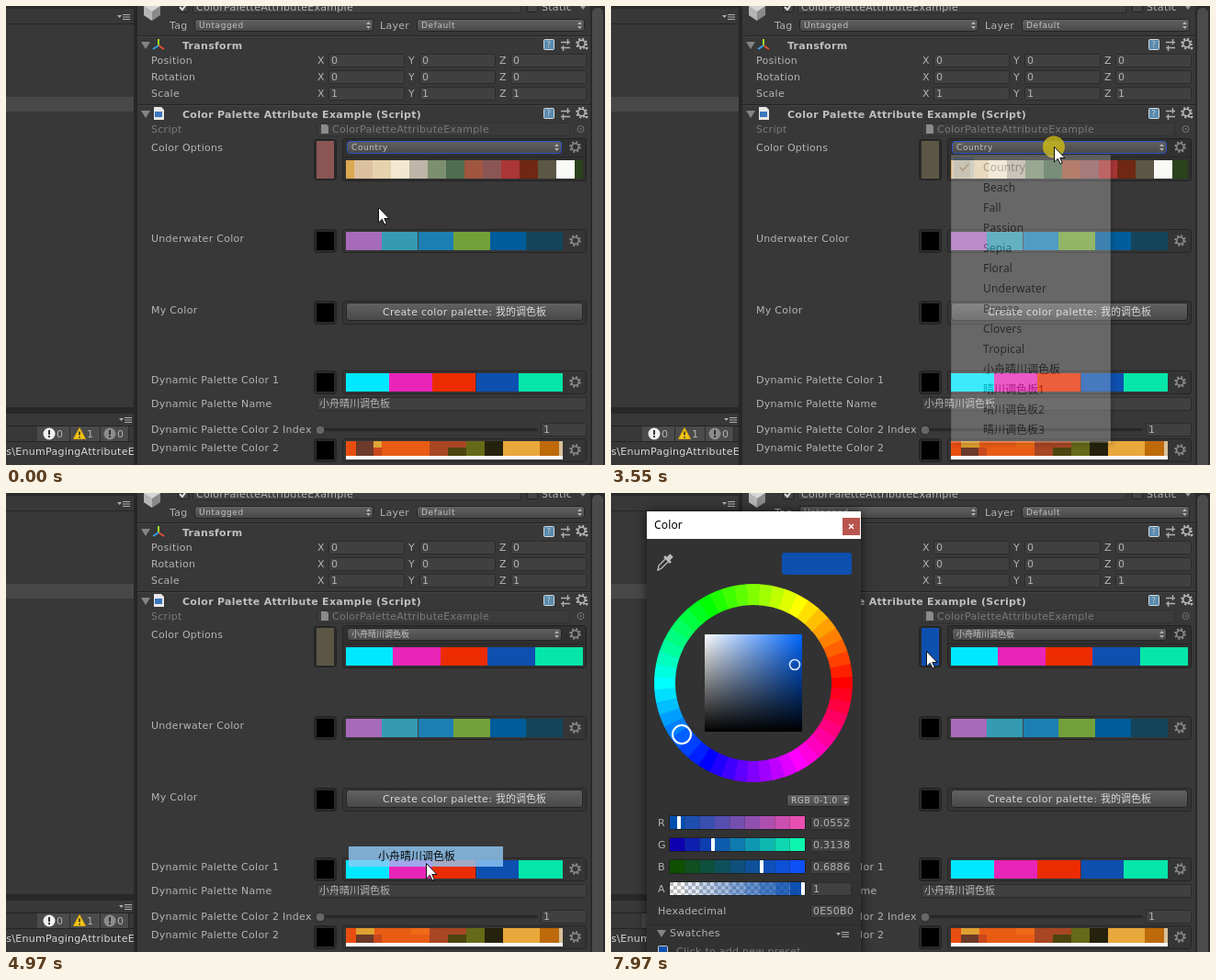
Recreate the animation shown at these times as an HTML page. Size 652x500 px, loop 8000 ms.

```html
<!DOCTYPE html>
<html lang="zh-CN">
<head>
<meta charset="utf-8">
<title>Palette inspector</title>
<style>
html, body { margin: 0; width: 100%; height: 100%; overflow: hidden; background: #383838; }
svg { display: block; width: 652px; height: 500px; }
text { font: 11px "DejaVu Sans", "Noto Sans CJK SC", "Noto Sans CJK", sans-serif; letter-spacing: .28px; fill: #b4b4b4; white-space: pre; }
.bold { font-weight: bold; letter-spacing: .3px; fill: #c0c0c0; }
.dim { fill: #7a7a7a; }
.light { fill: #d8d8d8; }
.mini { font-size: 9px; letter-spacing: .6px; fill: #c4c4c4; }
.cn { letter-spacing: 0; }
.menu { font: 12px "Noto Sans", "Noto Sans CJK SC", "Noto Sans CJK", sans-serif; letter-spacing: .15px; fill: #000; }
.menu.cn { letter-spacing: 0; }
.mid { text-anchor: middle; }
#frame { filter: drop-shadow(0 0 6px rgba(0,0,0,.65)); }
#list { filter: drop-shadow(3px 3px 2px rgba(0,0,0,.5)); }
</style>
</head>
<body>
<script>
const NAME = '小舟晴川调色板';
const COUNTRY = ['#d9a850', '#dbc19f', '#e6d3ae', '#f2e7d0', '#bfb5a8', '#7c9070', '#4f6d50',
  '#a0563f', '#8b5555', '#aa3637', '#702812', '#5c5645', '#f9faf6', '#2a431c'];
const NEON = ['#00e8ff', '#e825b8', '#ec2c00', '#0e50b0', '#06e6a8'];
const WATER = ['#a86abb', '#359bb3', '#1b7fb4', '#72a139', '#005c9a', '#14455b'];
const MENU = ['Country', 'Beach', 'Fall', 'Passion', 'Sepia', 'Floral', 'Underwater', 'Breeze',
  'Clovers', 'Tropical', NAME, '晴川调色板1', '晴川调色板2', '晴川调色板3'];

const rect = (x, y, w, h, fill, more = '') =>
  `<rect x="${x}" y="${y}" width="${w}" height="${h}" fill="${fill}" ${more}/>`;
const text = (x, y, s, cls = '', more = '') => `<text x="${x}" y="${y}" class="${cls}" ${more}>${s}</text>`;
const path = (d, fill, more = '') => `<path d="${d}" fill="${fill}" ${more}/>`;
const line = (d, color, w = 1) => path(d, 'none', `stroke="${color}" stroke-width="${w}"`);
const ring = (x, y, r, color, w = 1, more = '') =>
  `<circle cx="${x}" cy="${y}" r="${r}" fill="none" stroke="${color}" stroke-width="${w}" ${more}/>`;
const box = (x, y, w, h, fill, stroke, r = 1, more = '') =>
  rect(x + .5, y + .5, w - 1, h - 1, fill, `stroke="${stroke}" rx="${r}" ${more}`);
const field = (x, y, w, s, cls = '') => box(x, y, w, 15, '#404040', '#2b2b2b') + text(x + 3, y + 11, s, cls);
const strip = (x, y, w, h, colors) =>
  colors.map((c, i) => rect(x + Math.floor(i * w), y, Math.ceil(w), h, c)).join('');
const gear = (x, y, color = '#8c8c8c') =>
  ring(x, y, 3.8, color, 1.6) + ring(x, y, 5.4, color, 1.8, 'stroke-dasharray="2.12"');
const fold = (x, y) => path(`M${x} ${y}h10l-5 8z`, '#858585');
const panelMenu = (x, y) => path(`M${x} ${y + 2}h5l-2.5 3z`, '#b0b0b0') +
  line(`M${x + 6} ${y + 1.5}h8m-8 2.5h8m-8 2.5h8`, '#b0b0b0');

function popup(x, y, w, s, more = '') {
  const a = x + w - 8;
  return box(x, y, w, 14, 'url(#btn)', '#242424', 3, more) +
    path(`M${a} ${y + 6}h5l-2.5 -3zm0 2h5l-2.5 3z`, '#b0b0b0') + s;
}

function colorRow(label, y, inner, hasGear = true) {
  return text(158, y + 14, label) +
    box(335, y, 25, 26, '#2a2a2a', '#222', 3) + rect(338, y + 3, 19, 20, '#000') +
    box(366, y, 266, 26, '#353535', '#252525', 3) + inner +
    (hasGear ? gear(619.5, y + 12.5) : '');
}

function header(y, title) {
  return line(`M143 ${y - .5}H636`, '#232323') + line(`M143 ${y + .5}H636`, '#454545') +
    fold(147, y + 6) + text(192, y + 14, title, 'bold') +
    box(585, y + 3, 12, 12, '#5a8cb0', '#d4dce0') + text(591, y + 12, '?', 'mini mid light') +
    line(`M604 ${y + 6.5}h10m-10 6h10M611.5 ${y + 3}v6M606.5 ${y + 10}v6`, '#b0b0b0', 1.4) +
    gear(626.5, y + 8, '#bbb') + path(`M630 ${y + 12}h4l-2 3z`, '#bbb');
}

function leftSide() {
  return rect(0, 0, 139, 3, '#2b2b2b') + rect(0, 19, 139, 1, '#262626') + panelMenu(121, 8) +
    rect(0, 99, 139, 16, '#484848') +
    rect(0, 437, 139, 7, '#282828') + panelMenu(123, 447) + rect(0, 457, 139, 1, '#242424') +
    rect(34, 458, 99, 16, '#4b4b4b') + rect(0, 474, 139, 1, '#242424') +
    line('M69.5 458v16M102.5 458v16M133.5 458v16', '#2c2c2c') +
    `<circle cx="47" cy="466" r="6.5" fill="#f0f0f0"/>` + line('M47 462v5m0 1v2', '#333', 2) +
    path('M80 459.5l6.5 12h-13z', '#f5c518', 'stroke="#d8a810"') + line('M80 463.5v4m0 1.5v1.5', '#222', 1.5) +
    `<circle cx="113" cy="466" r="6.5" fill="#8c8c8c"/>` + line('M113 462v5m0 1v2', '#333', 2) +
    text(55, 470, '0') + text(88, 470, '1') + text(121, 470, '0') +
    text(-6, 489, 'cs\\EnumPagingAttributeExample', 'light') + rect(139, 0, 4, 500, '#272727');
}

function inspector() {
  let s = rect(143, 0, 509, 500, '#383838') + rect(636, 0, 16, 500, '#2b2b2b') +
    box(637, 1, 14, 520, '#4b4b4b', '#262626', 6);
  // object header
  s += path('M150 0h18v10l-9 6 -9-6z', '#8a8a8a') + path('M150 0l9 6v10l-9-6z', '#b5b5b5') + path('M150 0h18l-9 6z', '#d6d6d6') +
    box(187, -6, 12, 13, '#444', '#222') + line('M189 1l3 3 5-7', '#ddd', 2) +
    box(203, -7, 358, 15, '#404040', '#2b2b2b') + text(207, 5, 'ColorPaletteAttributeExample') +
    box(567, -6, 12, 13, '#444', '#222') + text(583, 5, 'Static') + path('M625 0h6l-3 4z', '#999') +
    text(178, 25, 'Tag') + popup(205, 14, 195, text(210, 24, 'Untagged', 'mini')) +
    text(407, 25, 'Layer') + popup(447, 14, 183, text(452, 24, 'Default', 'mini'));
  // transform
  s += header(33, 'Transform') + line('M166 44V36', '#9bdc28', 2) + line('M166 43l6 4', '#e0502c', 2) + line('M166 43l-6 4', '#38a0e8', 2);
  ['Position', 'Rotation', 'Scale'].forEach((label, r) => {
    const y = 52 + 18 * r;
    s += text(158, y + 11, label);
    ['X', 'Y', 'Z'].forEach((axis, c) => {
      s += text(339 + 99 * c, y + 11, axis) + field(351 + 99 * c, y, 83, r === 2 ? 1 : 0);
    });
  });
  // script component
  s += header(108, 'Color Palette Attribute Example (Script)') +
    path('M161 110h8l3 3v11h-11z', '#e8e8e8') + rect(162, 115, 8, 6, '#3a78c0') +
    text(158, 138, 'Script', 'dim') + box(338, 127, 276, 15, '#3b3b3b', '#303030') +
    path('M343 129h6l2 2v8h-8z', '#8a8a8a') + text(355, 138, 'ColorPaletteAttributeExample', 'dim') +
    ring(625.5, 134, 3.5, '#777') + `<circle cx="625.5" cy="134" r="1" fill="#777"/>`;
  // main palette
  s += text(158, 158, 'Color Options') + box(335, 145, 25, 45, '#2a2a2a', '#222', 3) +
    rect(338, 147, 19, 41, '#8b5555', 'id="swatch"') +
    box(366, 144, 266, 47, '#303030', '#222', 3) + rect(367, 164, 264, 1, '#262626') +
    popup(371, 147, 234, text(376, 157, 'Country', 'mini', 'id="choice"'), 'id="drop"') + gear(619.5, 153.5) +
    `<g clip-path="url(#view)"><g id="country">${strip(370, 168, 20, 20, COUNTRY)}</g>
    <g id="neon">${strip(370, 168, 51.6, 20, NEON)}</g></g>`;
  s += colorRow('Underwater Color', 243, strip(370, 246, 39.33, 20, WATER) + rect(448, 246, 1, 20, '#444'));
  s += colorRow('My Color', 321, box(370, 323, 258, 20, 'url(#btn)', '#242424', 3) +
    text(410, 337, 'Create color palette: <tspan class="cn">我的调色板</tspan>', 'light'), false);
  s += colorRow('Dynamic Palette Color 1', 397, strip(370, 400, 47.2, 20, NEON) + rect(511, 400, 1, 20, '#3a3050'));
  s += text(158, 437, 'Dynamic Palette Name') + field(338, 426, 294, NAME, 'cn');
  s += text(158, 465, 'Dynamic Palette Color 2 Index') + box(338, 460, 241, 3, '#2a2a2a', '#252525') +
    `<circle cx="342" cy="462" r="5" fill="#666" stroke="#252525"/>` + field(582, 454, 50, '1');
  const warm = [[370, '#e84e10'], [381, '#6b3a2a'], [400, '#e0a535'], [409, '#e85c14'], [461, '#a94624'], [481, '#4d4510'],
    [501, '#656a18'], [521, '#25220c'], [541, '#e8a83c'], [581, '#be6a0a'], [602, '#d8c09a'], [606]];
  let bars = '';
  for (let i = 0; i < warm.length - 1; i++) bars += rect(warm[i][0], 474, warm[i + 1][0] - warm[i][0], 16, warm[i][1]);
  bars += rect(370, 490, 236, 4, '#fff') + rect(481, 474, 20, 7, '#a94624') + rect(400, 481, 9, 9, '#c8481c') +
    `<g id="patch">${rect(381, 474, 20, 7, '#e0a030') + rect(401, 474, 32, 7, '#e85c14') + rect(441, 474, 20, 7, '#f06a18')}</g>`;
  return s + colorRow('Dynamic Palette Color 2', 471, bars);
}

function menu() {
  let s = `<g id="menu"><g id="list">${box(370, 162, 174, 314, '#f2f2f2', '#c8c8c8', 0)}</g>` +
    rect(373, 165, 22, 22, '#91c9f7') + rect(373, 165, 168, 22, '#91c9f7', 'id="hover"') +
    rect(373, 165, 22, 22, '#56b0fa', 'id="tick"') + line('M379.5 175.5l3.5 3.5 6.5-7', '#1a1a1a', 1.3);
  MENU.forEach((m, i) => s += text(405, 180 + 22 * i, m, i < 10 ? 'menu' : 'menu cn'));
  return s + `</g><g id="picked">${rect(373, 385, 168, 22, '#91c9f7') + text(405, 400, NAME, 'menu cn')}</g>`;
}

function wheel(cx, cy, r1, r0) {
  const n = 48, at = (r, a) => `${(cx + r * Math.cos(a)).toFixed(2)} ${(cy - r * Math.sin(a)).toFixed(2)}`;
  let s = '';
  for (let i = 0; i < n; i++) {
    const a = (i - .5) / n * 2 * Math.PI, b = a + 2.08 * Math.PI / n;
    s += path(`M${at(r1, a)}A${r1} ${r1} 0 0 0 ${at(r1, b)}L${at(r0, b)}A${r0} ${r0} 0 0 1 ${at(r0, a)}z`, `hsl(${i / n * 360} 100% 50%)`);
  }
  return s;
}

function picker() {
  let s = `<g id="picker">${rect(39, 20, 233, 500, '#323232', 'id="frame"')}` +
    rect(39, 20, 233, 30, '#fff') + text(47, 39, 'Color', 'menu') +
    rect(252, 27, 19, 19, '#b9554f') + line('M259 34l5 5m0-5l-5 5', '#fff', 1.4) +
    path('M51 84l1-5 8-8 3 3 -8 8z', '#323232', 'stroke="#c0c0c0" stroke-width="1.3"') +
    line('M58 69l7 7', '#bbb', 2.5) + line('M62 72l4-4', '#bbb', 5) +
    rect(186, 65, 76, 24, '#0e50b0', 'rx="3"') + wheel(155, 207, 108, 85) +
    ring(77, 263, 10, '#fff', 2) + rect(102, 154, 106, 106, 'url(#sat)') + rect(102, 154, 106, 106, 'url(#val)') +
    ring(200, 187, 5.5, '#dce8ff', 1.6) + popup(191, 328, 70, text(196, 338, 'RGB 0-1.0', 'mini'));
  const bars = [['R', '0.0552', 74, v => `rgb(${v * 232},79,176)`], ['G', '0.3138', 111, v => `rgb(14,${v * 245},176)`],
    ['B', '0.6886', 164, v => `rgb(14,80,${v * 245})`], ['A', '1', 209, v => `rgba(14,80,176,${v})`]];
  bars.forEach(([name, value, x, color], i) => {
    const y = 352 + 24 * i, n = 9;
    s += text(51, y + 11, name) + box(63, y - 1, 149, 16, '#222', '#222');
    if (i === 3) s += rect(64, y, 147, 14, 'url(#check)');
    for (let k = 0; k < n; k++) s += rect(64 + k * 147 / n, y, 147 / n, 14, color(k / (n - 1)));
    s += rect(x - 2, y, 4, 14, '#fff', 'rx="1"') + field(217, y, 45, value);
  });
  return s + text(51, 459, 'Hexadecimal') + field(217, 448, 45, '0E50B0') +
    rect(39, 470, 233, 1, '#2a2a2a') + fold(50, 476) + text(64, 483, 'Swatches') + panelMenu(245, 477) +
    box(51, 493, 11, 12, '#0e50b0', '#ccc') + text(71, 503, 'Click to add new preset', 'dim') + '</g>';
}

const stop = (o, c, a = 1) => `<stop offset="${o}" stop-color="${c}" stop-opacity="${a}"/>`;
document.body.innerHTML = `<svg viewBox="0 0 652 500"><defs>
  <linearGradient id="btn" x2="0" y2="1">${stop(0, '#626262') + stop(1, '#484848')}</linearGradient>
  <linearGradient id="sat">${stop(0, '#fff') + stop(1, '#0066ff')}</linearGradient>
  <linearGradient id="val" x2="0" y2="1">${stop(0, '#000', 0) + stop(1, '#000')}</linearGradient>
  <pattern id="check" width="8" height="8" patternUnits="userSpaceOnUse">${rect(0, 0, 8, 8, '#fff') + rect(0, 0, 4, 4, '#bbb') + rect(4, 4, 4, 4, '#bbb')}</pattern>
  <clipPath id="view">${rect(370, 168, 258, 20, '#000')}</clipPath></defs>
  ${leftSide() + inspector()}<circle id="click" r="12" fill="#cdbc14"/>${menu() + picker()}
  <g id="cursor">${path('M.5 .5V17L4.3 13.3 7 19 9.3 18 6.8 12.5H12z', '#fff', 'stroke="#111"')}</g></svg>`;

const $ = id => document.getElementById(id);
// bursts of movement: start, end, steps
const BURSTS = [[230, 380, 3], [610, 690, 2], [840, 1150, 5], [1380, 1460, 2], [1690, 2460, 11], [2530, 3310, 11], [3400, 3400, 1],
  [3550, 3720, 3], [3950, 4560, 9], [4880, 5570, 10], [5720, 6490, 11], [6570, 7190, 9], [7420, 7570, 3], [7720, 7800, 2], [7970, 7970, 1]];
const PATH = [[0, 405, 219], [150, 405, 219], [380, 391, 184], [530, 391, 184], [690, 399, 172], [760, 399, 172], [1150, 439, 154],
  [1300, 439, 154], [1460, 443, 174], [1610, 443, 174], [2000, 480, 183], [2383, 484, 182], [2460, 486, 182], [2760, 577, 182],
  [2850, 580, 183], [3310, 485, 157], [3400, 482, 153], [3880, 482, 153], [3950, 482, 171], [4560, 457, 403], [4960, 457, 403],
  [5570, 451, 183], [5800, 451, 183], [6182, 471, 186], [6413, 526, 184], [6490, 526, 184], [6800, 571, 180], [7190, 325, 179],
  [7350, 325, 179], [7570, 343, 172], [8000, 343, 172]];
const SCROLL = [[0, 11], [150, 11], [380, 4], [530, 4], [690, 0], [760, 0], [1150, 9], [1300, 9], [1460, 2], [1610, 2],
  [2306, 18], [2460, 18], [2760, 19], [8000, 19]];
const SWATCH = [[0, COUNTRY[8]], [2070, COUNTRY[6]], [2840, COUNTRY[11]], [5795, NEON[1]], [6410, NEON[3]]];
const CLICKS = [2070, 2840, 3550, 4880, 5795, 6410, 7720];

function hold(t) {
  const b = BURSTS.filter(b => b[0] <= t).pop();
  if (!b) return 0;
  const [start, end, n] = b, step = (end - start) / (n - 1) || 1;
  return start + Math.min(n - 1, Math.floor((t - start) / step + .1)) * step;
}

function along(points, t, k = 1) {
  const i = Math.max(1, points.findIndex(p => p[0] > t)), a = points[i - 1], b = points[i];
  return Math.round(a[k] + (b[k] - a[k]) * (t - a[0]) / (b[0] - a[0]));
}

const set = (id, key, value) => $(id).setAttribute(key, value);

function draw(now) {
  const t = hold(now % 8000), x = along(PATH, t), y = along(PATH, t, 2);
  const chosen = t >= 4880, open = t >= 3550 && !chosen, row = Math.floor((y - 165) / 22);
  set('cursor', 'transform', `translate(${x} ${y})`);
  set('click', 'transform', `translate(${x} ${y + .5})`);
  set('click', 'opacity', CLICKS.some(c => t >= c && t < c + 65) ? .8 : 0);
  set('country', 'transform', `translate(${-along(SCROLL, t)} 0)`);
  set('country', 'opacity', chosen ? 0 : 1);
  set('neon', 'opacity', chosen ? 1 : 0);
  set('swatch', 'fill', SWATCH.filter(s => s[0] <= t).pop()[1]);
  set('drop', 'stroke', chosen ? '#242424' : '#2b52c8');
  set('choice', 'class', chosen ? 'mini cn' : 'mini');
  $('choice').textContent = chosen ? NAME : 'Country';
  set('patch', 'opacity', t >= 3550 ? 1 : 0);
  set('menu', 'opacity', !open ? 0 : t < 3600 ? .25 : t < 3700 ? .75 : 1);
  set('hover', 'y', 165 + 22 * row);
  set('hover', 'opacity', row < 0 ? 0 : 1);
  set('tick', 'opacity', row === 0 ? 1 : 0);
  set('picked', 'opacity', chosen ? Math.max(0, .95 - ((t - 4880) / 200) ** 2) : 0);
  set('picker', 'opacity', t < 7720 ? 0 : t < 7800 ? .6 : 1);
  requestAnimationFrame(draw);
}
draw(performance.now());
</script>
</body>
</html>
```
